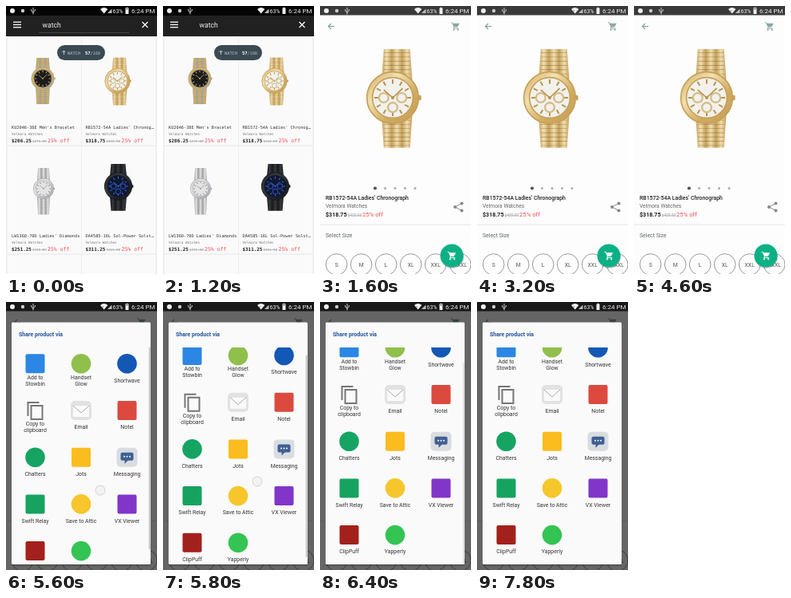
Animation, 189 px wide and 336 px high, one loop 8000 ms. Source, as an HTML page with a canvas:

```html
<!DOCTYPE html>
<html lang="en">
<head>
<meta charset="utf-8">
<title>Watch shop</title>
<style>
html, body { margin: 0; width: 100%; height: 100%; overflow: hidden; background: #fff; }
canvas { display: block; width: 100vw; height: 100vh; }
</style>
</head>
<body>
<canvas></canvas>
<script>
const W = 189, H = 336, LOOP = 8000, STEP = 200;
const canvas = document.querySelector('canvas');
const g = canvas.getContext('2d');
const SANS = 'Roboto, sans-serif', MONO = '"DejaVu Sans Mono", monospace';
const BRAND = 'Velmora Watches';
const clamp = (v, lo = 0, hi = 1) => Math.min(hi, Math.max(lo, v));

// Drawing helpers
function rect(x, y, w, h, color, r = 0) {
  g.fillStyle = color;
  g.beginPath();
  g.roundRect(x, y, w, h, r);
  g.fill();
}
function disc(x, y, r, fill, stroke, width = 1) {
  g.beginPath();
  g.arc(x, y, r, 0, Math.PI * 2);
  if (fill) { g.fillStyle = fill; g.fill(); }
  if (stroke) { g.strokeStyle = stroke; g.lineWidth = width; g.stroke(); }
}
function path(d, color, width, x = 0, y = 0) {
  g.save();
  g.translate(x, y);
  const p = new Path2D(d);
  if (width) { g.strokeStyle = color; g.lineWidth = width; g.stroke(p); }
  else { g.fillStyle = color; g.fill(p); }
  g.restore();
}
function text(s, x, y, size, color, { font = SANS, weight = 400, align = 'left', strike = false } = {}) {
  g.font = `${weight} ${size}px ${font}`;
  g.textAlign = align;
  g.fillStyle = color;
  g.fillText(s, x, y);
  if (strike) g.fillRect(x, y - size * .34, g.measureText(s).width, .5);
}
function cart(x, y, color) {
  path('M-3.8-3.8H5.2L2.6 1H-1.7Z', color, 0, x, y);
  path('M-5.5-4.6h1.7L-1.5 1l-1 1.6h6.7', color, 1, x, y);
  disc(x - 2, y + 4.3, 1.1, color);
  disc(x + 3.2, y + 4.3, 1.1, color);
}
const touch = (x, y) => disc(x, y, 6, 'rgba(240,240,240,.75)', 'rgba(120,120,120,.4)', .7);

// Watches, drawn around their dial centre for a bezel radius of 1; lean shifts the strap sideways
const GOLD = { edge: '#c6a05a', mid: '#f2dfae', bezel: '#cfa95c', face: '#f3f1ec', mark: '#b8924a', sub: '#d3bd8a', lean: .16 };
const TWO_TONE = { edge: '#a9a7a2', mid: '#d6b566', bezel: '#c9a95a', face: '#1b1b1d', mark: '#d9bd70', lean: 0 };
const SILVER = { edge: '#a3a5a7', mid: '#ececec', bezel: '#bcbec0', face: '#e3e3e4', mark: '#85878a', lean: 0 };
const SPORT = { edge: '#15171b', mid: '#34383f', bezel: '#20242b', face: '#10182f', mark: '#3c68d8', sub: '#2448b0', lean: 0 };

function watch(x, y, r, c, up = 1.85, down = 2.1, half = .62) {
  g.save();
  g.translate(x, y);
  g.scale(r, r);
  g.save();
  g.translate(c.lean, 0);
  const strap = g.createLinearGradient(-half, 0, half, 0);
  [c.edge, c.mid, c.edge, c.mid, c.edge, c.mid, c.edge].forEach((color, i) => strap.addColorStop(i / 6, color));
  const end = half * .86;
  path(`M${-end} ${-up}H${end}L${half} -.7V.7L${end} ${down}H${-end}L${-half} .7V-.7Z`, strap);
  for (let ly = -up + .13; ly < down; ly += .16) rect(-end, ly, end * 2, .025, 'rgba(80,60,25,.35)');
  g.restore();
  rect(.92, -.1, .16, .2, c.edge, .05);
  const bezel = g.createLinearGradient(-1, -1, 1, 1);
  [c.bezel, c.mid, c.bezel, c.edge].forEach((color, i) => bezel.addColorStop(i / 3, color));
  disc(0, 0, .98, bezel, c.edge, .05);
  disc(0, 0, .77, c.face, c.edge, .05);
  for (let i = 0; i < 12; i++) {
    g.save();
    g.rotate(i * Math.PI / 6);
    rect(-.03, -.7, .06, .17, c.mark);
    g.restore();
  }
  if (c.sub) for (const [sx, sy] of [[-.34, 0], [.34, 0], [0, .37]]) disc(sx, sy, .18, null, c.sub, .07);
  path('M0 0L-.34-.3M0 0L.38-.36', c.mark, .05);
  disc(0, 0, .06, c.mark);
  g.restore();
}

function statusBar(t) {
  disc(8, 6, 3, '#eee');
  disc(21, 6, 2.2, '#ccc');
  path('M34 2V10.5M31.7 4v2.3l2.3 2M36.3 4v2L34 8', '#ddd', .9);
  path('M118 4Q122.7 0 127.4 4L122.7 9.5Z', '#eee');
  path('M132.5 3.5V9H127Z', '#bbb');
  if (t >= 2200) rect(120.5, 5.3, 1.4, 1.8, '#999');
  text('63%', 133.5, 9, 7, '#eee');
  rect(149.5, 2.5, 4, 7.5, '#eee', .5);
  rect(150.5, 1.7, 2, 1, '#eee');
  const dimmed = t < 600 || (t >= 2600 && t < 3200) || (t >= 3600 && t < 7200);
  if (dimmed) rect(149.5, 2.5, 4, 2, '#999');
  text('6:24 PM', 157, 9, 8, '#eee');
}

const PRODUCTS = [
  ["KU2046-38E Men's Bracelet", '$206.25', '$275.00', () => watch(46, 91, 14.5, TWO_TONE, 1.8, 2.2)],
  ["RB1572-54A Ladies' Chronog…", '$318.75', '$425.00', () => watch(139.5, 94, 16, GOLD, 1.85, 1.9, .58)],
  ["LW1360-70D Ladies' Diamonds", '$251.25', '$335.00', () => watch(47, 229, 13, SILVER, 2, 2.5)],
  ['DA4585-16L Sol-Power Solst…', '$311.25', '$415.00', () => watch(140.5, 226, 17.5, SPORT, 1.6, 1.75, .6)],
];

function listPage(t) {
  rect(0, 0, W, H, '#eeeeee');
  for (let i = 0; i < 6; i++) rect(i % 2 ? 95 : 2, 40 + 136 * (i >> 1), 92, 134.5, '#fafafa');
  PRODUCTS.forEach(([name, price, old, picture], i) => {
    const x = i % 2 ? 99.5 : 7, y = 136 * (i >> 1);
    picture();
    text(name, x, 154 + y, 5.25, '#333', { font: MONO });
    text(BRAND, x, 161.7 + y, 4.35, '#777', { font: MONO });
    text(price, x, 171 + y, 5.9, '#222', { font: MONO, weight: 700 });
    text(old, x + 26, 170.7 + y, 4.2, '#999', { font: MONO, strike: true });
    text('25% off', x + 45, 171 + y, 6.5, '#f05058', { font: MONO });
  });
  rect(0, 0, W, 12, '#050505');
  rect(0, 12, W, 26, '#212121');
  for (const y of [19.5, 22.8, 26.1]) rect(9, y, 10, 1.3, '#fff');
  text('watch', 45.5, 26.5, 8.6, '#eee');
  if (t < 600) rect(41, 33, 113, .6, '#666');
  path('M170.5 20l7 7M177.5 20l-7 7', '#fff', 1.2);
  rect(64, 49, 60, 19, '#3a4a53', 9.5);
  path('M72.5 61v-5M70.5 58l2-2 2 2', '#dfe6ea', .8);
  text('WATCH', 77, 60.6, 5.3, '#b6c2c9', { font: MONO });
  text('57', 99, 60.6, 5.6, '#fff', { font: MONO, weight: 700 });
  text('/100', 105.5, 60.6, 5.2, '#b6c2c9', { font: MONO });
}

function detailPage() {
  rect(0, 0, W, H, '#fdfdfd');
  path('M18 25.5h-7.5M14 22l-3.5 3.5L14 29', '#7d9c9a', 1.1);
  cart(169.5, 25.5, '#8ba8a3');
  watch(91, 115, 33, GOLD, 1.85, 1.9, .58);
  for (let i = 0; i < 5; i++) disc(69 + 12.5 * i, 228.5, i ? 1.5 : 2.1, i ? '#aaa' : '#555');
  text("RB1572-54A Ladies' Chronograph", 7, 242.5, 6.9, '#222', { weight: 500 });
  text(BRAND, 7, 253, 6.7, '#666');
  text('$318.75', 7, 264.3, 7.1, '#222', { weight: 700 });
  text('$425.00', 34.5, 264.3, 4.9, '#999', { strike: true });
  text('25% off', 53, 264.3, 7.7, '#f05058');
  path('M177.5 247.5L169 252l8.5 4.5', '#888', 1);
  for (const [x, y] of [[177.5, 247.5], [169, 252], [177.5, 256.5]]) disc(x, y, 2, '#888');
  rect(0, 273.7, W, .7, '#e0e0e0');
  text('Select Size', 7, 290, 6.9, '#5c6664');
  ['S', 'M', 'L', 'XL', 'XXL', 'XXXL'].forEach((size, i) => {
    const x = 20.7 + 31 * i;
    disc(x, 324, 13.3, null, '#808080', .8);
    text(size, x, 326.5, 6.8, '#555', { align: 'center' });
  });
  disc(165.5, 314.5, 14.5, 'rgba(0,0,0,.2)');
  disc(165, 313, 14.5, '#0bb184');
  cart(165, 313, '#fff');
}

// Share targets: label lines, then how the icon is drawn at its centre
const square = color => (x, y) => rect(x - 12, y - 12, 24, 24, color, 2);
const circle = color => (x, y) => disc(x, y, 12.3, color);
function copyIcon(x, y) {
  path('M-9 7V-10H5', '#757575', 2, x, y);
  path('M-5-6H9V11H-5Z', '#757575', 2, x, y);
}
function mailIcon(x, y) {
  rect(x - 13, y - 12, 26, 24, '#e2e2e2', 5);
  rect(x - 10, y - 6, 20, 14, '#fafafa', 1);
  path('M-10-6L0 3 10-6', '#aaa', 1, x, y);
}
function messageIcon(x, y) {
  rect(x - 13, y - 12, 26, 24, '#d9dce1', 5);
  rect(x - 8, y - 6, 16, 10, '#405f94', 2);
  path('M-3 3v5L2 3Z', '#405f94', 0, x, y);
  for (const dx of [-3.5, 0, 3.5]) disc(x + dx, y - 1, 1, '#fff');
}
const TARGETS = [
  ['Add to|Stowbin', square('#2b87e3')], ['Handset|Glow', circle('#8fc04c')], ['Shortwave', circle('#1458b5')],
  ['Copy to|clipboard', copyIcon], ['Email', mailIcon], ['Notel', square('#dc4a3f')],
  ['Chatters', circle('#16a463')], ['Jots', square('#fbbc1f')], ['Messaging', messageIcon],
  ['Swift Relay', square('#16a360')], ['Save to Attic', circle('#f7c62c')], ['VX Viewer', square('#8136c9')],
  ['ClipPuff', square('#a3211c')], ['Yapperly', circle('#34c453')],
];

function shareDialog(t) {
  const scroll = clamp((t - 5600) / STEP * 10.3, 0, 20);
  rect(0, 0, W, H, 'rgba(0,0,0,.6)');
  rect(7, 26.5, 174, 304, 'rgba(0,0,0,.25)', 1.5);
  rect(7, 25.5, 174, 303.5, '#fafafa', 1.5);
  text('Share product via', 16, 42.5, 7, '#24549a', { weight: 700 });
  g.save();
  g.beginPath();
  g.rect(7, 57, 174, 272);
  g.clip();
  TARGETS.forEach(([label, icon], i) => {
    const x = 36.5 + 57.5 * (i % 3), y = 77.3 + 58.7 * Math.floor(i / 3) - scroll;
    const lines = label.split('|');
    icon(x, y);
    lines.forEach((line, n) => text(line, x, y + 23.3 + (n - (lines.length - 1) / 2) * 8, 6.9, '#333', { align: 'center' }));
  });
  const barAlpha = t < 5200 || (t >= 5600 && t < 6400) ? 1 : t >= 6400 && t < 6600 ? .5 : 0;
  rect(178.8, 57 + scroll * .95, 1.7, 253, `rgba(150,150,150,${barAlpha * .6})`);
  g.restore();
  if (t >= 5600 && t < 6200) touch(118, 225 - (t - 5800) / STEP * 11);
}

function draw(t) {
  if (t < 1600) {
    listPage(t);
    if (t >= 600 && t < 1000) touch(141, 112);
  }
  if (t >= 1400) {
    const entered = clamp((t - 1200) / 400);
    g.save();
    g.globalAlpha = entered;
    g.translate(0, 20 * (1 - entered));
    detailPage();
    g.restore();
    rect(0, 0, W, 11.5, '#3a3a3a');
    if (t >= 4200 && t < 4600) touch(173, 252);
  }
  if (t >= 4800) {
    g.save();
    g.globalAlpha = t < 5000 ? .6 : 1;
    shareDialog(t);
    g.restore();
  }
  statusBar(t);
}

const start = performance.now();
function frame() {
  const dpr = window.devicePixelRatio || 1;
  const w = Math.round(innerWidth * dpr), h = Math.round(innerHeight * dpr);
  if (canvas.width !== w || canvas.height !== h) { canvas.width = w; canvas.height = h; }
  g.setTransform(w / W, 0, 0, h / H, 0, 0);
  g.clearRect(0, 0, W, H);
  const t = (performance.now() - start) % LOOP;
  draw(Math.floor(t / STEP) * STEP);
  requestAnimationFrame(frame);
}
frame();
</script>
</body>
</html>
```
